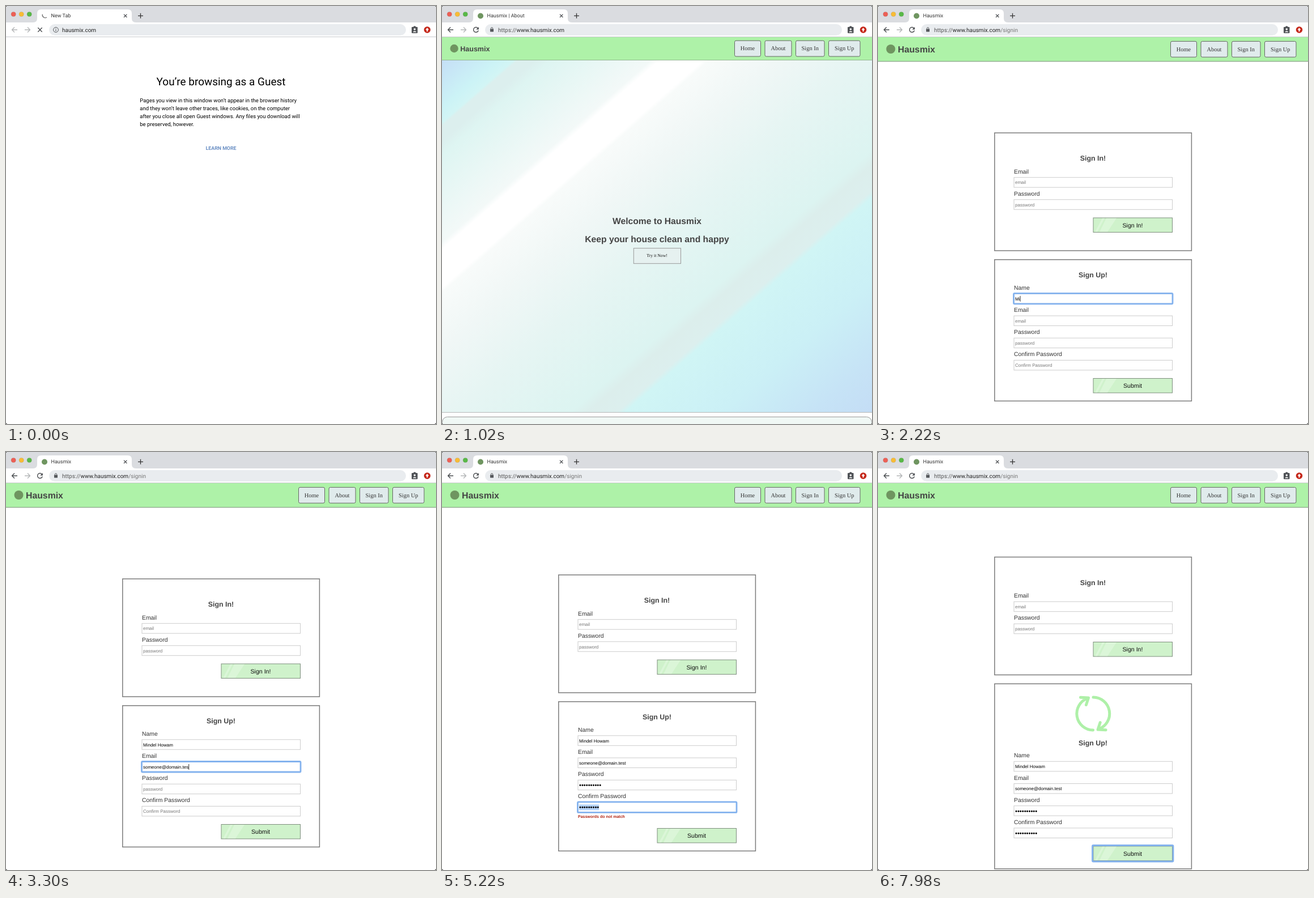
Recreate the animation shown at these times as an HTML page. Size 759x738 px, loop 8000 ms.

```html
<!DOCTYPE html>
<html lang="en">
<head>
<meta charset="utf-8">
<title>Sign-up walkthrough</title>
<style>
  html, body { margin: 0; width: 100%; height: 100%; overflow: hidden; background: #111; }
  svg { display: block; width: 759px; height: 738px; text-rendering: geometricPrecision; }
  .ui { font-family: Roboto, sans-serif; }
  .sans { font-family: "Liberation Sans", Arial, sans-serif; }
  .serif { font-family: "Liberation Serif", "Times New Roman", serif; }
  .bold { font-weight: 700; }
</style>
</head>
<body>
<svg viewBox="0 0 759 738">
  <defs>
    <linearGradient id="sky" gradientUnits="userSpaceOnUse" x1="0" y1="97" x2="633" y2="825">
      <stop offset="0" stop-color="#c5dff6"/>
      <stop offset=".065" stop-color="#ccf3f6"/>
      <stop offset=".085" stop-color="#d2f5f5"/>
      <stop offset=".09" stop-color="#dcefee"/>
      <stop offset=".11" stop-color="#dcefee"/>
      <stop offset=".13" stop-color="#def5f2"/>
      <stop offset=".25" stop-color="#f3f9f8"/>
      <stop offset=".26" stop-color="#fff"/>
      <stop offset=".313" stop-color="#fff"/>
      <stop offset=".32" stop-color="#f8fbfa"/>
      <stop offset=".4" stop-color="#f0f7f6"/>
      <stop offset=".5" stop-color="#e6f5f3"/>
      <stop offset=".64" stop-color="#dcf4f1"/>
      <stop offset=".66" stop-color="#dceeec"/>
      <stop offset=".695" stop-color="#dcefee"/>
      <stop offset=".705" stop-color="#d0f5f5"/>
      <stop offset=".82" stop-color="#cbf0f6"/>
      <stop offset=".93" stop-color="#c6e3f6"/>
      <stop offset="1" stop-color="#c4ddf5"/>
    </linearGradient>
    <clipPath id="window"><rect width="759" height="738" rx="3"/></clipPath>
  </defs>
  <g id="stage" clip-path="url(#window)"></g>
</svg>
<script>
const LOOP = 8000;
const stage = document.getElementById('stage');
const pen = document.createElement('canvas').getContext('2d');

// Moments and the typing pace, in ms
const COMMIT = 720, ABOUT = 930, FORM = 1440;
const ERROR_ON = 4440, RETYPE = 5700, LOADING = 7080;
const KEY = 36;
const FOCUS = [
  [1980, 'name'], [2620, 'email'], [3380, 'password'], [3800, 'confirm'],
  [4180, 'submit'], [4860, 'confirm'], [6240, 'submit']
];

const rect = (x, y, w, h, fill, more = '') =>
  `<rect x="${x}" y="${y}" width="${w}" height="${h}" fill="${fill}" ${more}/>`;
const circle = (x, y, r, fill, more = '') =>
  `<circle cx="${x}" cy="${y}" r="${r}" fill="${fill}" ${more}/>`;
const line = (d, color, width = 1.4, more = '') =>
  `<path d="${d}" fill="none" stroke="${color}" stroke-width="${width}" ${more}/>`;
const text = (x, y, size, cls, str, fill = '#111', anchor = 'start') =>
  `<text x="${x}" y="${y}" font-size="${size}" class="${cls}" fill="${fill}" text-anchor="${anchor}">${str}</text>`;
const shift = (dy, body) => `<g transform="translate(0 ${dy})">${body}</g>`;

const typed = (str, t, start) =>
  str.slice(0, Math.max(0, Math.floor((t - start) / KEY)));

function tabIcon(t) {
  if (t >= COMMIT) return circle(68, 17.5, 5, '#6f9560');
  return line('M72 20A5 5 0 0 1 64.4 14.6', '#777', 1.4,
    `transform="rotate(${-t * 0.36} 68 17.2)"`);
}

function chrome(t) {
  const ready = t >= COMMIT;
  const title = t < COMMIT ? 'New Tab' : t < FORM ? 'Hausmix | About' : 'Hausmix';
  const back = ready ? '#4a4d50' : '#b4b6b8';
  const lights = ['#ed5f55', '#f8bc35', '#58b947'].map((c, i) =>
    circle(13.2 + i * 14, 14.5, 4.1, c, 'stroke="#0002" stroke-width=".7"')).join('');
  const reload = ready
    ? line('M63.4 39.2A4.4 4.4 0 1 0 64.2 43.2', '#4a4d50') +
      '<path d="M64.9 36.9v4.6h-4.6z" fill="#4a4d50"/>'
    : line('M56.3 38.3l7.4 7.4M63.7 38.3l-7.4 7.4', '#4a4d50');
  const site = ready
    ? rect(85, 40.6, 6, 5, '#55585c', 'rx=".7"') +
      line('M86.3 41v-1.4a1.7 1.7 0 0 1 3.4 0v1.4', '#55585c', 1)
    : circle(88, 42, 4.4, 'none', 'stroke="#55585c" stroke-width="1"') +
      line('M88 41.2v3.2M88 39.2v1.1', '#55585c', 1.1);
  const path = t >= FORM ? '<tspan fill="#777">/signin</tspan>' : '';
  const url = ready
    ? `<tspan fill="#555">https://</tspan>www.hausmix.com${path}` : 'hausmix.com';
  return rect(0, 0, 759, 29, '#dadce0') + lights +
    '<path d="M48 29q7 0 7-7v-9q0-7 7-7h153q7 0 7 7v9q0 7 7 7z" fill="#fff"/>' +
    tabIcon(t) + text(79.5, 20.3, 9, 'ui', title, '#333') +
    line('M208 14.6l5.4 5.4M213.4 14.6l-5.4 5.4', '#45484c', 1.2) +
    line('M233 17.3h9M237.5 12.8v9', '#333', 1.3) +
    rect(0, 29, 759, 26, '#fff') + rect(0, 54, 759, 1, '#c9cbce') +
    line('M20 42h-9M15 37.6l-4.4 4.4l4.4 4.4', back) +
    line('M33 42h9M38 37.6l4.4 4.4l-4.4 4.4', '#b4b6b8') + reload +
    rect(76, 32, 630, 20, '#e9ecef', 'rx="10"') + site +
    text(99, 45.5, 10, 'ui', url, '#222') +
    rect(716, 37, 10.5, 11, '#505357', 'rx="1.2"') +
    rect(719.2, 35.6, 4.2, 3, '#505357', 'rx="1.4"') +
    circle(721.3, 41, 1.7, '#fff') + '<path d="M718 46.3q3.3-4.2 6.6 0z" fill="#fff"/>' +
    circle(743.5, 42, 5.8, '#c5291c') +
    '<path d="M743.5 38.6l3 3.3h-1.9v3h-2.2v-3h-1.9z" fill="#fff"/>';
}

function guestPage() {
  const lines = [
    'Pages you view in this window won’t appear in the browser history',
    'and they won’t leave other traces, like cookies, on the computer',
    'after you close all open Guest windows. Any files you download will',
    'be preserved, however.'
  ];
  return text(379.5, 139.5, 18.93, 'ui', 'You’re browsing as a Guest', '#000', 'middle') +
    lines.map((s, i) => text(236.3, 169.7 + i * 14, 9.47, 'ui', s, '#000')).join('') +
    text(379.5, 253.6, 8.8, 'ui bold', 'LEARN MORE', '#6a8fc4', 'middle');
}

function header(big) {
  const dy = big ? 1.2 : 0;
  const nav = [['Home', 516.5, 46], ['About', 570, 47], ['Sign In', 624.5, 50.5], ['Sign Up', 682.5, 55.5]];
  return rect(0, 55, 759, big ? 42.5 : 40.5, '#aef2a8') +
    rect(0, big ? 97.3 : 95.2, 759, 1, big ? '#71906f' : '#87a886') +
    (big ? circle(22.5, 76, 8, '#6f9560') : circle(21.5, 75, 7.2, '#6f9560')) +
    (big ? text(35, 81.7, 15.8, 'sans bold', 'Hausmix', '#444')
         : text(32.3, 79.5, 12.5, 'sans bold', 'Hausmix', '#444')) +
    shift(dy, nav.map(([label, x, w]) =>
      rect(x, 61.2, w, 27.8, '#e0ebec', 'rx="2.5" stroke="#666" stroke-width="1"') +
      text(x + w / 2, 78.4, 10.4, 'serif', label, '#333', 'middle')).join(''));
}

function aboutPage() {
  return header(false) + rect(0, 96, 759, 621, 'url(#sky)') +
    rect(0, 717, 759, 1, '#b5b8b8') +
    rect(0.5, 725.5, 758, 40, '#f0f8f5', 'rx="9" stroke="#999"') +
    text(379.5, 385.2, 15.65, 'sans bold', 'Welcome to Hausmix', '#444', 'middle') +
    text(379.5, 416.8, 15.7, 'sans bold', 'Keep your house clean and happy', '#444', 'middle') +
    rect(338.3, 427.7, 83.2, 27, '#e6f1f0', 'stroke="#999"') +
    text(379.5, 443.4, 7.75, 'serif', 'Try it Now!', '#111', 'middle');
}

const ring = (x, y, w, h) =>
  rect(x - 0.5, y - 0.5, w + 1, h + 1, 'none', 'rx="1.5" stroke="#83b2ee" stroke-width="2.8"');

function field(y, label, hint, value = '', opts = {}) {
  const { secret, focused, selected } = opts;
  const shown = secret ? '•'.repeat(value.length) : value;
  const size = secret ? 11.2 : 8;
  pen.font = `${size}px "Liberation Sans", Arial, sans-serif`;
  const width = pen.measureText(shown).width;
  return text(240, y - 7, 10.4, 'sans', label, '#333') +
    rect(240, y, 279.5, 17.5, '#fff', 'stroke="#ccc" stroke-width="1"') +
    (focused ? ring(240, y, 279.5, 17.5) : '') +
    (selected ? rect(242, y + 4, width, 10, '#b4d2f7') : '') +
    (shown ? text(242, y + (secret ? 13 : 11.7), size, 'sans', shown, '#000')
           : text(242, y + 11.7, 8, 'sans', hint, '#777')) +
    (focused && !selected ? rect(242.2 + width, y + 4, 0.8, 10, '#000') : '');
}

function button(y, label, focused) {
  return rect(380, y, 139.5, 25.5, '#cff2cb', 'stroke="#7f8f7e" stroke-width="1"') +
    `<path d="M403 ${y + 0.5}h18l-16 24.5h-14zM396 ${y + 0.5}h4l-13 24.5h-4z" fill="#fff" opacity=".25"/>` +
    (focused ? ring(379, y - 1, 141.5, 27.5) : '') +
    text(449.5, y + 16.5, 10.6, 'sans', label, '#111', 'middle');
}

const panel = (y, h) =>
  rect(205.8, y, 347.6, h, '#fff', 'stroke="#7b7b7b" stroke-width="1.5"');

function spinner(t, y) {
  const arm = 'M0 29A29 29 0 0 1 -10 -27.2M-22.5 -28.6L-8.5 -28L-12.5 -15.5';
  const half = line(arm, '#aef0a8', 5, 'stroke-linecap="round" stroke-linejoin="round"');
  const turn = (t - LOADING) / 900 * 360;
  return `<g transform="translate(379.8 ${y}) rotate(${turn})">${half}<g transform="rotate(180)">${half}</g></g>`;
}

function formPage(t) {
  const focus = (FOCUS.filter(f => t >= f[0]).pop() || [0, ''])[1];
  const error = t >= ERROR_ON && t < RETYPE;
  const loading = t >= LOADING;
  const extra = error ? 14 : loading ? 77 : 0;
  const up = -extra / 2;
  const drop = loading ? 77 : 0;
  const confirm = t < RETYPE ? typed('x'.repeat(9), t, 3820)
                             : typed('x'.repeat(10), t, RETYPE - KEY);
  const signIn = panel(224, 208) +
    text(379.5, 273.4, 12.4, 'sans bold', 'Sign In!', '#444', 'middle') +
    field(302.7, 'Email', 'email') + field(341.8, 'Password', 'password') +
    button(374, 'Sign In!');
  const signUp =
    text(379.5, 479, 12.4, 'sans bold', 'Sign Up!', '#444', 'middle') +
    field(507.8, 'Name', 'name', typed('Mindel Howam', t, 2140), { focused: focus === 'name' }) +
    field(547, 'Email', 'email', typed('someone@domain.test', t, 2640), { focused: focus === 'email' }) +
    field(586.2, 'Password', 'password', typed('x'.repeat(10), t, 3400),
      { secret: true, focused: focus === 'password' }) +
    field(625.4, 'Confirm Password', 'Confirm Password', confirm,
      { secret: true, focused: focus === 'confirm', selected: focus === 'confirm' && error }) +
    (error ? text(240, 653, 7, 'sans bold', 'Passwords do not match', '#b0210f') : '') +
    button(error ? 671.5 : 657.5, 'Submit', focus === 'submit');
  return header(true) + shift(up, signIn + panel(447.8, 249.6 + extra) +
    (loading ? spinner(t, 500.5) : '') + shift(drop, signUp));
}

function page(t) {
  if (t < COMMIT) return guestPage();
  if (t < ABOUT) return '';
  return t < FORM ? aboutPage() : formPage(t);
}

let last = '';
function draw(now) {
  const t = now % LOOP;
  const next = rect(0, 0, 759, 738, '#fff') + chrome(t) + page(t);
  if (next !== last) stage.innerHTML = last = next;
}

const start = performance.now();
function tick() {
  draw(performance.now() - start);
  requestAnimationFrame(tick);
}
tick();
</script>
</body>
</html>
```
